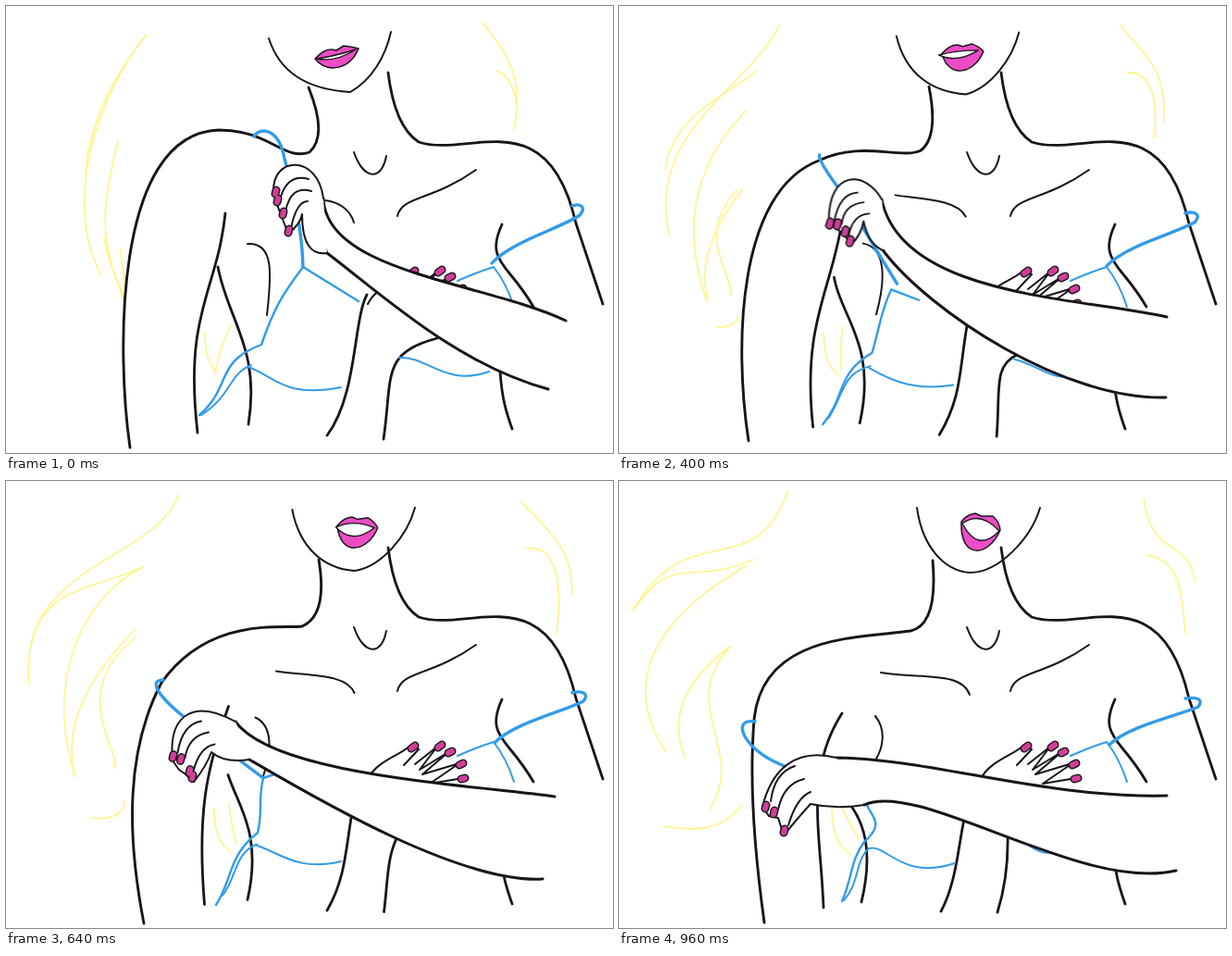
Recreate the animation shown at these times as an HTML page without scripts. Size 656x483 px, loop 1.04 s.

```html
<!DOCTYPE html>
<html lang="en">
<head>
<meta charset="utf-8">
<title>Line drawing</title>
<style>
html, body { margin: 0; width: 100%; height: 100%; overflow: hidden; background: #fff; }
svg { display: block; width: 656px; height: 483px; fill: none; stroke: #17151b; stroke-width: 2; stroke-linecap: round; stroke-linejoin: round; }
/* drawings are held, so each move runs in steps */
[class] { animation: 1.04s steps(12) infinite; }
.locks, .wisps, .side-hair, .low-hair { stroke: #fff488; stroke-width: 1.6; }
.seam, .hem, .cup, .strap, .band { stroke: #329bea; }
.strap, .band { stroke-width: 3.4; }
.locks { animation-name: locks; }
.wisps { animation-name: wisps; }
.side-hair { animation-name: side-hair; }
.low-hair { animation-name: low-hair; }
.seam { animation-name: seam; stroke-width: 2.4; }
.hem { animation-name: hem; }
.cup { animation-name: cup; }
.strap { animation-name: strap; }
.band { animation-name: band; }
.shoulder { animation-name: shoulder; stroke-width: 2.9; }
.sides { animation-name: sides; stroke-width: 2.8; }
.jaw { animation-name: jaw; }
.chest { animation-name: chest; }
.lips { animation-name: lips; fill: #ec4cc4; stroke-width: 1.5; }
.mouth { animation-name: mouth; fill: #fff; stroke-width: 1.4; }
.forearm { animation-name: forearm; fill: #fff; stroke-width: 3; }
.hand { animation-name: hand; }
.palm { animation-name: palm; fill: #fff; }
.fingers { animation-name: fingers; }
.nails { animation-name: nails; }
.rim { stroke-width: 9; }
.polish { stroke: #cf3f98; stroke-width: 6; }

@keyframes locks {
0% { d: path("M151 32C100 95 60 210 103 292M121 145C105 215 98 250 128 318M123 262C126 280 128 295 130 310M106 250C110 275 120 295 128 315"); animation-timing-function: steps(8) }
61.537% { d: path("M186 15C165 85 10 90 25 220M148 93C85 125 40 210 75 320M140 160C90 210 60 265 75 320M139 170C65 230 125 290 117 310"); animation-timing-function: steps(4) }
92.307%, to { d: path("M183 10C145 115 75 35 15 140M137 92C20 160 10 230 50 292M121 178C65 220 55 260 72 300M121 178C60 245 140 290 98 355") }
}
@keyframes wisps {
0% { d: path("M151 32C110 85 90 130 86 180M128 316C128 316 128 317 128 318"); animation-timing-function: steps(8) }
61.537% { d: path("M148 93C100 115 40 115 28 175M128 345C130 360 110 367 92 364"); animation-timing-function: steps(4) }
92.307%, to { d: path("M145 85C75 115 60 75 15 140M133 350C110 380 80 378 48 373") }
}
@keyframes side-hair {
0% { d: path("M515 18C535 45 562 70 549 133M530 70C545 75 551 95 551 105"); animation-timing-function: steps(8) }
61.537% { d: path("M557 22C590 60 612 70 612 122M562 73C595 68 602 110 595 165"); animation-timing-function: steps(4) }
92.307%, to { d: path("M567 18C575 85 615 60 622 107M570 80C605 85 608 115 612 165") }
}
@keyframes low-hair {
0% { d: path("M215 352Q215 388 228 395M243 345Q230 372 226 398") }
92.307%, to { d: path("M230 355Q230 390 250 403M240 350Q250 372 260 388") }
}
@keyframes seam {
0% { d: path("M381 319L321 282C300 310 290 325 276 366C225 385 245 410 209 442"); animation-timing-function: steps(8) }
61.537% { d: path("M290 317L278 321C272 345 278 355 272 380C240 405 245 430 227 458"); animation-timing-function: steps(4) }
92.307%, to { d: path("M276 335L266 345C270 362 290 368 265 390C250 410 252 430 241 454") }
}
@keyframes hem {
0% { d: path("M265 388C240 398 245 420 211 442M262 390C290 400 300 424 362 412"); animation-timing-function: steps(4) }
30.768% { d: path("M272 388C238 395 240 420 224 444M270 390C300 410 325 413 361 409"); animation-timing-function: steps(8) }
92.307%, to { d: path("M270 397C255 410 260 435 243 453M270 397C290 392 305 432 363 413") }
}
@keyframes cup {
0% { d: path("M425 380C455 378 475 412 522 395") }
92.307%, to { d: path("M430 384C450 400 460 405 470 400") }
}
@keyframes strap {
0% { d: path("M268 141C275 130 295 132 301 165C308 190 320 240 321 282"); animation-timing-function: steps(4) }
30.768% { d: path("M232 143C236 150 246 164 256 182C266 203 280 240 308 293"); animation-timing-function: steps(4) }
61.537% { d: path("M170 215C155 215 162 230 190 253C210 270 250 300 278 321"); animation-timing-function: steps(4) }
92.307%, to { d: path("M147 260C120 256 135 290 174 306C205 320 240 335 266 345") }
}
@keyframes band {
0% { d: path("M525 278C545 255 600 240 620 226C628 217 620 213 612 216") }
92.307%, to { d: path("M530 285C550 265 600 255 626 244C632 236 625 233 612 235") }
}
@keyframes shoulder {
0% { d: path("M327 88Q348 140 328 158C300 168 285 134 230 134C115 138 120 380 134 477"); animation-timing-function: steps(4) }
30.768% { d: path("M334 88Q345 140 328 156C305 168 275 145 232 150C128 170 122 360 137 467"); animation-timing-function: steps(4) }
61.537% { d: path("M338 85Q348 145 320 157C300 160 220 145 168 218C130 290 130 380 149 478"); animation-timing-function: steps(4) }
92.307%, to { d: path("M339 86Q345 155 315 162C260 170 155 165 146 258C140 330 147 405 157 477") }
}
@keyframes sides {
0% { d: path("M237 224C228 310 192 330 207 461M229 282C240 340 275 370 262 452M390 312C375 340 380 420 347 464M466 359C405 375 418 400 408 468"); animation-timing-function: steps(4) }
30.768% { d: path("M240 236C232 310 195 340 208 454M230 285C235 330 280 360 260 450M377 340C368 390 372 420 346 463M432 376C402 384 412 410 408 465"); animation-timing-function: steps(8) }
92.307%, to { d: path("M241 251C200 315 218 380 221 461M250 350C265 370 275 400 262 455M373 365C366 400 364 435 348 465M420 382C421 420 414 450 409 466") }
}
@keyframes jaw {
0% { d: path("M284 35C296 72 325 90 372 93C395 80 410 55 416 28") }
92.307%, to { d: path("M322 29C328 72 352 97 379 99C412 99 446 60 455 29") }
}
@keyframes chest {
0% { d: path("M261 257C290 255 287 290 282 334M345 210C360 212 372 220 376 234"); animation-timing-function: steps(4) }
30.768% { d: path("M262 257C290 260 288 300 278 338M301 204C330 208 365 210 374 227"); animation-timing-function: steps(8) }
92.307%, to { d: path("M277 254C290 270 284 290 278 300M283 207C325 214 370 205 379 231") }
}
@keyframes lips {
0% { d: path("M334 57Q344 46 352 47L357 48 365 43Q374 44 381 46C372 68 348 74 334 57Z") }
92.307%, to { d: path("M370 44Q376 36 385 35L392 38 404 38Q411 44 412 53C400 82 368 86 370 44Z") }
}
@keyframes mouth {
0% { d: path("M336 57Q356 54 378 47Q356 61 336 57Z"); animation-timing-function: steps(4) }
30.768% { d: path("M342 54Q362 50 385 47Q362 60 342 54Z"); animation-timing-function: steps(8) }
92.307%, to { d: path("M371 46Q390 32 411 54Q388 78 371 46Z") }
}
@keyframes forearm {
0% { d: path("M605 340C515 298 346 288 343 208Q325 215 347 267C403 309 486 387 586 414"); animation-timing-function: steps(4) }
30.768% { d: path("M587 334C490 312 321 315 299 202Q283 212 297 262C342 328 476 422 585 417"); animation-timing-function: steps(2) }
46.153% { d: path("M597 338C512 318 292 315 269 217Q248 235 275 268C330 333 487 430 597 429"); animation-timing-function: steps(2) }
61.537% { d: path("M593 341C500 328 290 318 248 260Q222 280 263 301C335 343 491 435 580 430"); animation-timing-function: steps(4) }
92.307%, to { d: path("M592 340C458 343 338 300 235 299Q208 325 265 350C325 322 500 445 602 421") }
}
@keyframes hand {
0% { transform: translate(310px, 171px); animation-timing-function: steps(2) }
15.384% { transform: translate(290px, 171px); animation-timing-function: steps(2) }
30.768% { transform: translate(270px, 178px); animation-timing-function: steps(2) }
46.153% { transform: translate(235px, 198px); animation-timing-function: steps(2) }
61.537% { transform: translate(208px, 247px); animation-timing-function: steps(2) }
76.922% { transform: translate(201px, 270px); animation-timing-function: steps(2) }
92.307%, to { transform: translate(190px, 297px) }
}
@keyframes palm {
0% { d: path("M33 37C27 -11 -22 -9 -21 29L-18 41 -12 57 -5 75Q8 65 10 54Q10 100 37 96"); animation-timing-function: steps(4) }
30.768% { d: path("M29 24C20 -10 -25 -18 -25 44L-17 48 -8 54 -1 68Q10 58 11 44Q14 75 27 84"); animation-timing-function: steps(4) }
61.537% { d: path("M40 13C-3 -11 -33 3 -28 55L-21 65 -15 69 -5 78Q8 62 14 46Q28 58 55 54"); animation-timing-function: steps(4) }
92.307%, to { d: path("M45 2C0 -9 -25 15 -35 55L-28 65 -18 67 -12 86Q5 65 17 52Q45 58 75 53") }
}
@keyframes fingers {
0% { d: path("M-13 35Q-5 10 17 16M-8 51Q-2 22 20 29M-2 69Q4 40 16 40"); animation-timing-function: steps(4) }
30.768% { d: path("M-19 44Q-13 14 6 14M-11 46Q-9 26 12 24M-4 58Q0 36 18 36"); animation-timing-function: steps(8) }
92.307%, to { d: path("M-26 49Q-22 18 0 11M-18 58Q-12 30 10 25M-7 75Q2 45 17 39") }
}
@keyframes nails {
0% { d: path("M-18 28l-1 4M-16 37l-1 4M-10 51l-1 4M-4 70l-1 4"); animation-timing-function: steps(4) }
30.768% { d: path("M-23 44l-1 4M-15 44l-1 4M-7 50l-1 4M-1 62l-1 4"); animation-timing-function: steps(8) }
92.307%, to { d: path("M-31 53l-1 4M-22 59l-1 4M-11 79l-1 4M-11 79l-1 4") }
}
</style>
</head>
<body>
<svg viewBox="0 0 656 483">
  <defs>
    <path id="tips" d="M438 289l4 -3M467 288l4 -3M478 294l4 -2M490 307l4 -2M492 322l4 -1"/>
  </defs>
  <path class="locks"/>
  <path class="wisps"/>
  <path class="side-hair"/>
  <path class="low-hair"/>
  <path class="shoulder"/>
  <path class="sides"/>
  <g stroke-width="2.8">
    <path d="M413 72Q420 130 446 147C500 165 585 100 616 235L645 322"/>
    <path d="M536 236C524 262 530 272 545 290Q560 308 570 325M534 395C536 425 541 440 547 457"/>
  </g>
  <path class="jaw"/>
  <path class="chest"/>
  <path d="M376 158C387 189 406 189 411 162M423 227C428 205 460 211 508 177"/>
  <path class="lips"/>
  <path class="mouth"/>
  <path class="seam"/>
  <path class="hem"/>
  <path class="cup"/>
  <path class="strap"/>
  <path class="band"/>
  <path stroke="#329bea" d="M488 297Q508 288 527 282Q541 300 549 325"/>
  <!-- resting hand, uncovered as the arm drops -->
  <path fill="#fff" d="M391 322C400 303 425 297 437 286L446 290 430 307M442 306L466 287 447 312 478 293 450 317 490 305 458 327 494 321"/>
  <use href="#tips" stroke-width="9"/>
  <use href="#tips" stroke="#cf3f98" stroke-width="6"/>
  <path class="forearm"/>
  <g class="hand">
    <path class="palm"/>
    <path class="fingers"/>
    <path class="nails rim"/>
    <path class="nails polish"/>
  </g>
</svg>
</body>
</html>
```
